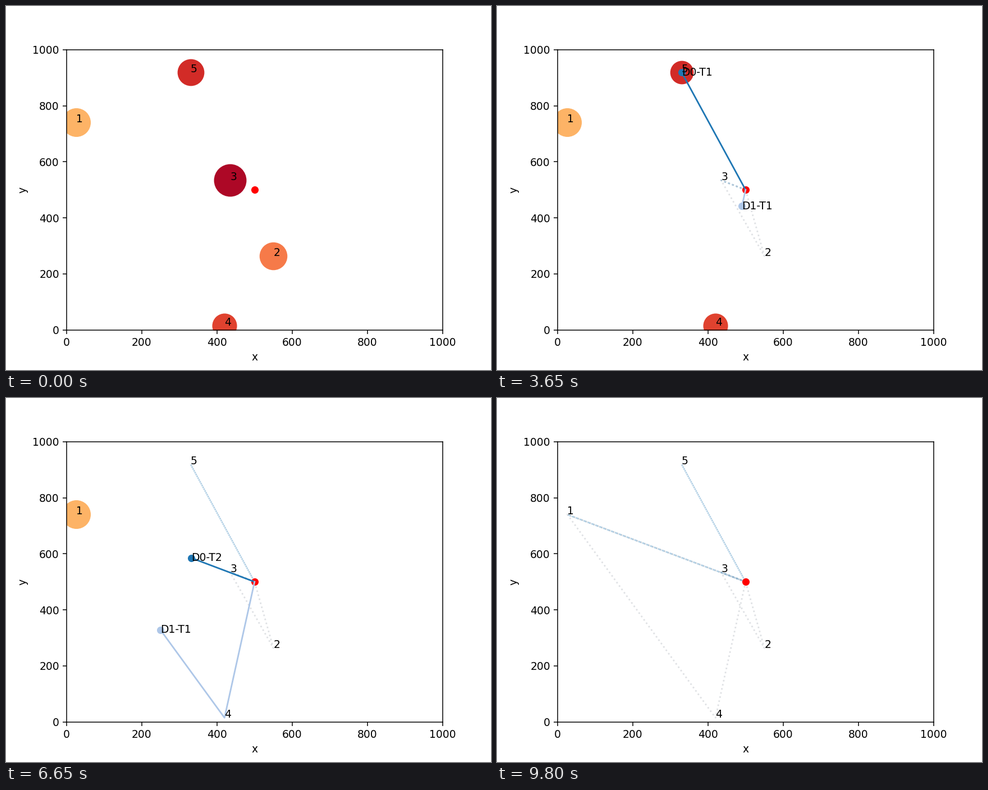
Write a matplotlib script that moves like this. It is 864 by 648 pixels and loops after 10000 ms.

```python
import numpy as np
import matplotlib.pyplot as plt
from matplotlib.animation import FuncAnimation

FRAMES, INTERVAL = 200, 50
SPEED = 18.32    # distance units per frame
RATE = 28.6      # marker area removed per frame by one drone
REST = 10        # frames spent in the depot between trips
DEPOT = (500, 500)
SITES = {1: (26, 740), 2: (550, 264), 3: (435, 534), 4: (420, 15), 5: (330, 919)}
HEAT = {1: 0.69, 2: 0.78, 3: 0.982, 4: 0.87, 5: 0.91}

# Per drone: trips made of (site, frames of service) stops
PLANS = [
    [[(3, 25.28)], [(5, 20.08)], [(1, 15.03)]],
    [[(3, 4.87), (2, 21.7)], [(4, 16.95), (1, 8.11)]],
]
COLORS = ["#1f77b4", "#aec7e8"]
TRAILS = [("#1f77b4", 0.33), ("#a5aab4", 0.35)]

plt.rcParams["font.family"] = "DejaVu Sans"
fig, ax = plt.subplots(figsize=(6.4, 4.8), dpi=135)
ax.set(xlim=(0, 1000), ylim=(0, 1000), xlabel="x", ylabel="y")

visits = {site: [] for site in SITES}


def build_trip(start, stops):
    """Timed key points of one round trip, noting each service period."""
    t, here = start, DEPOT
    keys, route = [(t, *here)], [here]
    for site, service in stops + [(None, 0)]:
        there = SITES.get(site, DEPOT)
        t += np.hypot(there[0] - here[0], there[1] - here[1]) / SPEED
        keys.append((t, *there))
        route.append(there)
        if site:
            visits[site].append((t, t + service))
            t += service
            keys.append((t, *there))
        here = there
    return np.array(keys), np.array(route)


class Drone:
    def __init__(self, index, plan):
        color = COLORS[index]
        trail_color, alpha = TRAILS[index]
        self.name = f"D{index}"
        self.trips, self.trails = [], []
        start = 0
        for stops in plan:
            keys, route = build_trip(start, stops)
            start = keys[-1, 0] + REST
            self.trips.append(keys)
            trail, = ax.plot(*route.T, ":", color=trail_color, alpha=alpha, zorder=1.8)
            self.trails.append(trail)
        self.path, = ax.plot([], [], color=color)
        self.dot, = ax.plot([], [], "o", color=color)
        self.label = ax.text(0, 0, "", va="center")

    def update(self, t):
        flying = False
        for number, (keys, trail) in enumerate(zip(self.trips, self.trails)):
            times, xs, ys = keys.T
            trail.set_visible(t >= times[-1])
            if times[0] < t < times[-1]:
                flying = True
                x, y = np.interp(t, times, xs), np.interp(t, times, ys)
                done = times <= t
                self.path.set_data(np.append(xs[done], x), np.append(ys[done], y))
                self.dot.set_data([x], [y])
                self.label.set_position((x, y))
                self.label.set_text(f"{self.name}-T{number}")
        for artist in (self.path, self.dot, self.label):
            artist.set_visible(flying)


def demand_left(site, t):
    return RATE * sum(end - max(t, begin) for begin, end in visits[site] if t < end)


cmap = plt.get_cmap("RdYlBu_r")
circles = {}
for site, (x, y) in SITES.items():
    circles[site] = ax.scatter([x], [y], color=[cmap(HEAT[site])], linewidths=1.5)
    ax.text(x, y, str(site))
ax.plot(*DEPOT, "o", color="red")
drones = [Drone(i, plan) for i, plan in enumerate(PLANS)]


def update(frame):
    for site, circle in circles.items():
        area = demand_left(site, frame)
        circle.set_sizes([area])
        circle.set_visible(area > 0)
    for drone in drones:
        drone.update(frame)
    return []


anim = FuncAnimation(fig, update, frames=FRAMES, interval=INTERVAL, repeat=True,
                     repeat_delay=0, blit=False)
plt.show()
```
